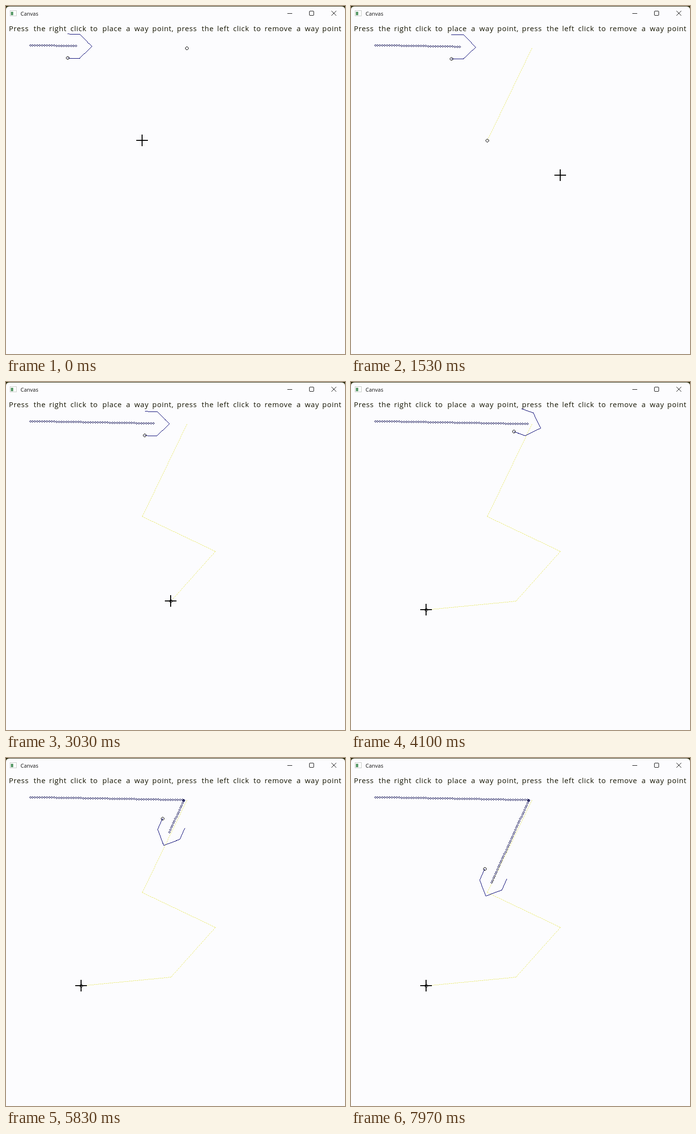
These frames come from a looping animation (700 by 720 pixels, 8000 ms). An HTML page with a canvas:

```html
<!DOCTYPE html>
<html lang="en">
<head>
<meta charset="utf-8">
<title>Canvas</title>
<style>
  html, body { margin: 0; width: 100%; height: 100%; overflow: hidden; background: #2b2b0c; }
  svg, canvas { position: absolute; left: 0; top: 0; width: 700px; height: 720px; }
  .title { font: 11px "Open Sans", sans-serif; fill: #111; }
  .hint { font: 15px "Open Sans", sans-serif; letter-spacing: .7px; fill: #141400; }
  .button { fill: none; stroke: #111; }
</style>
</head>
<body>
<svg viewBox="0 0 700 720">
  <path d="M0 720V8Q0 1 7 1H693Q700 1 700 8V720Z" fill="#fcfcfe"/>
  <rect x="8.5" y="9.5" width="13" height="11" fill="#fff" stroke="#c4c8c4"/>
  <rect x="10" y="12" width="5" height="7" fill="#5a9a6a"/>
  <text class="title" x="30" y="20">Canvas</text>
  <path class="button" d="M581 15.5h10M672 10l10 10m0-10l-10 10"/>
  <rect class="button" x="626.5" y="10.5" width="9" height="9" rx="1.5"/>
  <text class="hint" id="hint" y="52"></text>
</svg>
<canvas id="stage" width="700" height="720"></canvas>
<script>
const LOOP = 8000, TICK = 46.875, STEP = 2.5, DOT_GAP = 5;
const ctx = document.getElementById('stage').getContext('2d');

// Instruction line, one word at a time on its wide spacing
const words = 'Press the right click to place a way point, press the left click to remove a way point'.split(' ');
const wordX = [6, 57, 89, 133, 174, 199, 248, 265, 302, 353, 404, 436, 469, 511, 534, 600, 617, 653];
words.forEach((word, i) => {
  const span = document.createElementNS('http://www.w3.org/2000/svg', 'tspan');
  span.setAttribute('x', wordX[i]);
  span.textContent = word + ' ';
  document.getElementById('hint').append(span);
});

const waypoints = [[373, 87], [281, 278], [432, 350], [340, 453], [155, 471]];
const clickTimes = [-1, 450, 1850, 2900, 4000];
const moves = [[900, 1450], [2100, 2797], [3470, 3950]];

// The robot drives to the corner, turns on the spot, then drives on
const legs = [
  { x: 50, y: 81, length: 317.5, heading: Math.atan2(6, 323) },
  { x: 367.5, y: 87, length: 300, heading: Math.atan2(191, -86.5) }
];
const START = 102, TURN_TICK = 86, LEAVE_TICK = 93, TURN_RATE = 18 * Math.PI / 180;

const clamp = (v, lo, hi) => Math.min(hi, Math.max(lo, v));
const along = (leg, d) => [leg.x + d * Math.cos(leg.heading), leg.y + d * Math.sin(leg.heading)];
const firstLeg = tick => Math.min(START + tick * STEP, legs[0].length);
const secondLeg = tick => (tick - LEAVE_TICK) * STEP;

function pixel(x, y) {
  ctx.fillRect(Math.round(x), Math.round(y), 1, 1);
}

function line([x0, y0], [x1, y1], dotted) {
  const n = Math.ceil(Math.max(Math.abs(x1 - x0), Math.abs(y1 - y0)));
  for (let i = 0; i <= n; i++) {
    if (!dotted || i % 4 < 3) pixel(x0 + (x1 - x0) * i / n, y0 + (y1 - y0) * i / n);
  }
}

function outline([x, y], r, distance) {
  for (let dx = -r; dx <= r; dx++)
    for (let dy = -r; dy <= r; dy++)
      if (Math.round(distance(dx, dy)) === r) pixel(Math.round(x) + dx, Math.round(y) + dy);
}
const circle = p => outline(p, 3, Math.hypot);
const dot = p => outline(p.map(Math.floor), 2, (dx, dy) => Math.abs(dx) + Math.abs(dy));

function drawRoute(t) {
  const count = clickTimes.filter(time => time <= t).length;
  ctx.fillStyle = '#eaea78';
  for (let i = 1; i < count; i++) line(waypoints[i - 1], waypoints[i], true);
  ctx.fillStyle = '#000';
  circle(waypoints[count - 1]);
}

function drawTrail(tick) {
  ctx.fillStyle = '#000048';
  for (let d = 0; d <= firstLeg(tick); d += DOT_GAP) dot(along(legs[0], d));
  if (tick > TURN_TICK) {
    dot([366, 87]);
    dot([367, 87]);
  }
  for (let d = STEP; d <= secondLeg(tick); d += DOT_GAP) dot(along(legs[1], d));
}

function drawRobot(tick) {
  const second = secondLeg(tick);
  const [x, y] = second > 0 ? along(legs[1], second) : along(legs[0], firstLeg(tick));
  const turn = Math.max(0, tick - TURN_TICK) * TURN_RATE;
  const heading = Math.min(legs[0].heading + turn, legs[1].heading);
  const c = Math.cos(heading), s = Math.sin(heading);
  const hull = [[-25, -25], [0, -25], [25, 0], [0, 25], [-25, 25]]
    .map(([fx, fy]) => [x + fx * c - fy * s, y + fx * s + fy * c]);
  ctx.fillStyle = '#000070';
  for (let i = 1; i < hull.length; i++) line(hull[i - 1], hull[i]);
  ctx.fillStyle = '#000';
  circle(hull[4]);
}

function drawCursor(t) {
  let [x, y] = waypoints[1];
  moves.forEach(([from, to], i) => {
    const u = clamp((t - from) / (to - from), 0, 1), ease = u * u * (3 - 2 * u);
    const [a, b] = [waypoints[i + 1], waypoints[i + 2]];
    x += (b[0] - a[0]) * ease;
    y += (b[1] - a[1]) * ease;
  });
  x = Math.round(x);
  y = Math.round(y);
  ctx.fillStyle = '#000';
  ctx.fillRect(x - 12, y - 1, 24, 2);
  ctx.fillRect(x - 1, y - 12, 2, 24);
}

function draw() {
  const t = performance.now() % LOOP, tick = Math.floor(t / TICK);
  ctx.clearRect(0, 0, 700, 720);
  drawRoute(t);
  drawTrail(tick - 1);
  drawRobot(tick);
  drawCursor(t);
  requestAnimationFrame(draw);
}
draw();
</script>
</body>
</html>
```
